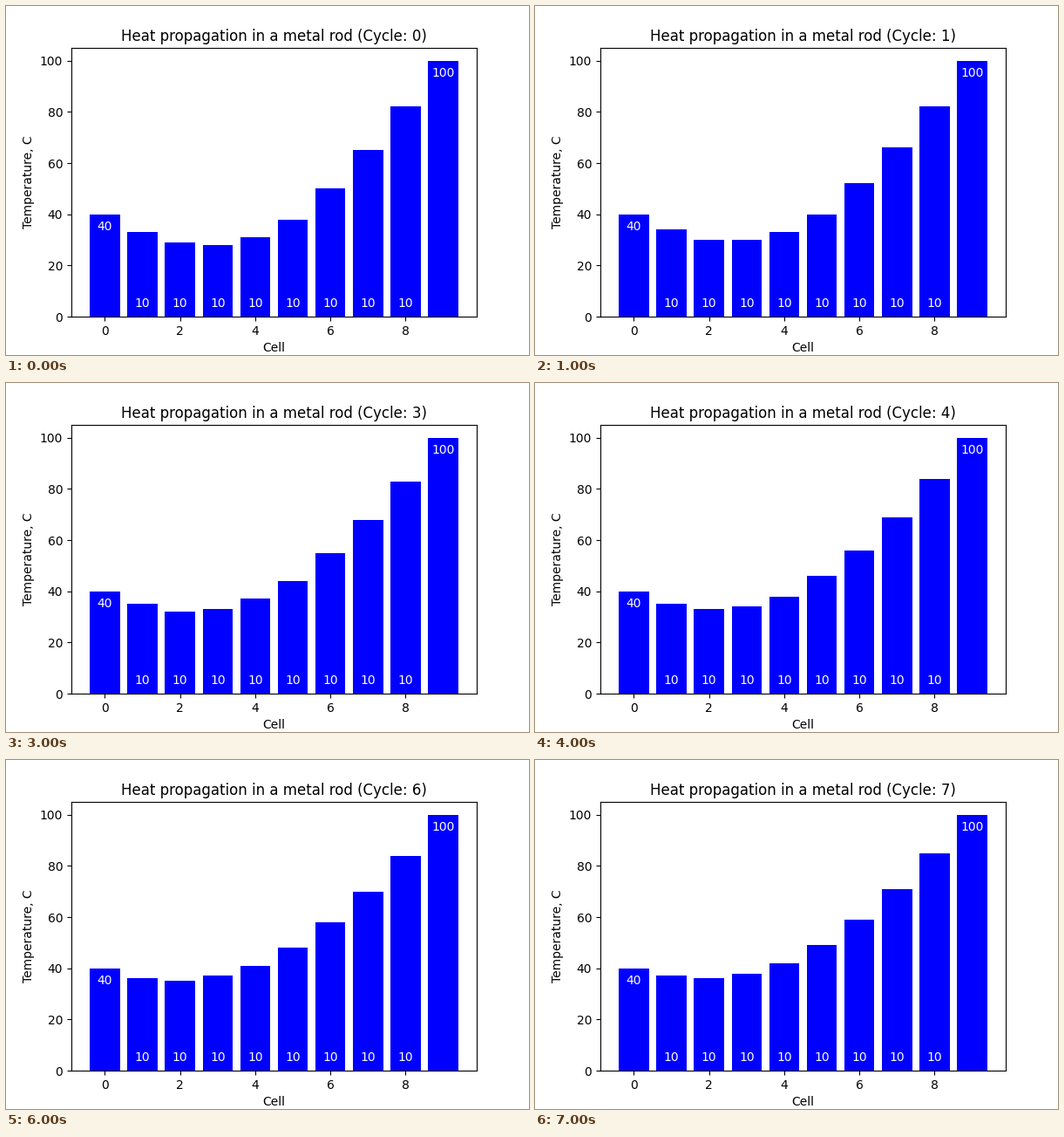
Write a matplotlib script that moves like this. It is 600 by 400 pixels and loops after 8 s.

```python
import matplotlib.pyplot as plt
from matplotlib.animation import FuncAnimation

CYCLES = 8
START = [40, 33, 29, 28, 31, 38, 50, 65, 82, 100]
LABELS = [40] + [10] * 8 + [100]


def spread(temps):
    """One in-place cycle of integer heat exchange; both ends stay fixed."""
    for i in range(1, len(temps) - 1):
        bend = temps[i - 1] + temps[i + 1] - 2 * temps[i]
        temps[i] += 2 * bend // 5


def temps_at(cycle):
    temps = START.copy()
    for _ in range(cycle):
        spread(temps)
    return temps


fig, ax = plt.subplots(figsize=(6, 4), dpi=100)
bars = ax.bar(range(len(START)), START, color="blue")
ax.set_ylim(0, 105)
ax.set_xlabel("Cell")
ax.set_ylabel("Temperature, C")
title = ax.set_title("")
for x, value in enumerate(LABELS):
    ax.text(x, value - 5, str(value), color="white", ha="center", va="center")


def update(cycle):
    for bar, temp in zip(bars, temps_at(cycle)):
        bar.set_height(temp)
    title.set_text(f"Heat propagation in a metal rod (Cycle: {cycle})")
    return [*bars, title]


anim = FuncAnimation(fig, update, frames=CYCLES, interval=1000,
                     repeat=True, repeat_delay=0)
plt.show()
```
